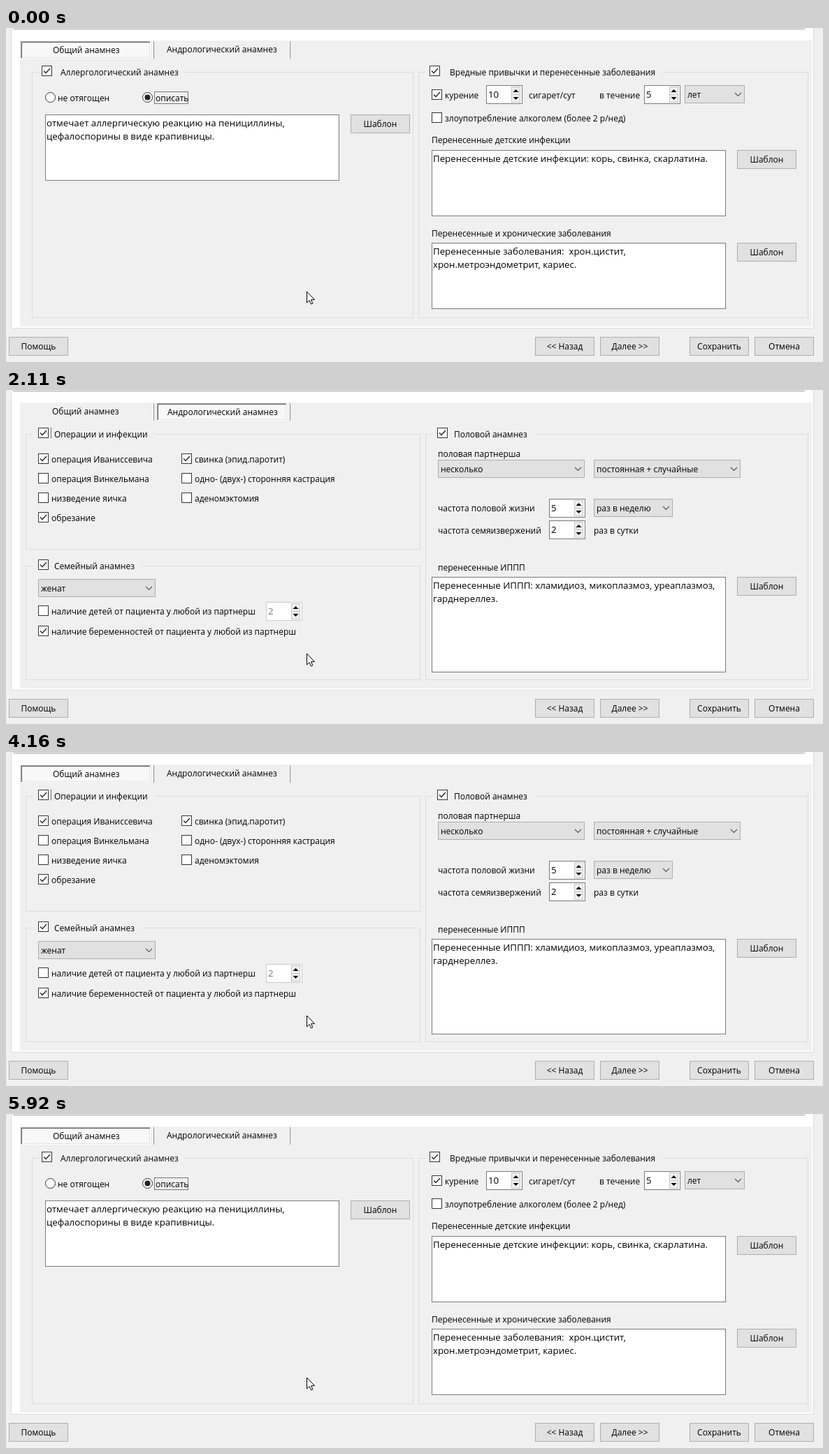
Write an HTML page with a canvas that moves like this. It is 1169x479 px and loops after 6.6 s.

```html
<!DOCTYPE html>
<html lang="ru">
<head>
<meta charset="utf-8">
<title>Анамнез</title>
<style>
html, body { margin: 0; width: 100%; height: 100%; overflow: hidden; background: #f0f0f0; }
canvas { display: block; }
</style>
</head>
<body>
<canvas id="stage" width="1169" height="479"></canvas>
<script>
const ctx = document.getElementById('stage').getContext('2d');
const LOOP = 6600;
const FACE = '#f0f0f0', EDGE = '#adadad', DARK = '#333', FIELD = '#7a7a7a';
const SMALL = 12, LARGE = 13.28;

function fill(x, y, w, h, color) {
  ctx.fillStyle = color;
  ctx.fillRect(x, y, w, h);
}

function box(x, y, w, h, bg, edge) {
  fill(x, y, w, h, edge);
  fill(x + 1, y + 1, w - 2, h - 2, bg);
}

function line(points, color, width = 1) {
  ctx.beginPath();
  points.forEach(([x, y]) => ctx.lineTo(x, y));
  ctx.strokeStyle = color;
  ctx.lineWidth = width;
  ctx.stroke();
}

function shape(points, color) {
  ctx.beginPath();
  points.forEach(([x, y]) => ctx.lineTo(x, y));
  ctx.closePath();
  ctx.fillStyle = color;
  ctx.fill();
}

function text(s, x, y, size = SMALL, color = '#000', align = 'left') {
  ctx.font = size + 'px "Open Sans", "Noto Sans", sans-serif';
  ctx.textAlign = align;
  ctx.fillStyle = color;
  ctx.fillText(s, x, y);
}

function button(s, x, y) {
  box(x, y, 85, 27, '#e1e1e1', EDGE);
  text(s, x + 42.5, y + 18, SMALL, '#000', 'center');
}

function check(x, y, on) {
  box(x, y, 15, 15, '#fff', DARK);
  if (on) line([[x + 3, y + 7.5], [x + 6, y + 10.5], [x + 12, y + 4]], '#222', 1.3);
}

function option(s, x, y, on) {
  check(x, y, on);
  text(s, x + 19, y + 13);
}

function radio(x, y, on) {
  ctx.beginPath();
  ctx.arc(x, y, 7, 0, 7);
  ctx.fillStyle = '#fff';
  ctx.fill();
  ctx.strokeStyle = DARK;
  ctx.lineWidth = 1;
  ctx.stroke();
  if (!on) return;
  ctx.beginPath();
  ctx.arc(x, y, 4, 0, 7);
  ctx.fillStyle = '#222';
  ctx.fill();
}

function dotted(x, y, w, h) {
  ctx.setLineDash([1, 1]);
  ctx.strokeStyle = '#000';
  ctx.lineWidth = 1;
  ctx.strokeRect(x + .5, y + .5, w, h);
  ctx.setLineDash([]);
}

function group(title, x, y, w, h, checkX, titleX, gapEnd) {
  ctx.strokeStyle = '#dcdcdc';
  ctx.lineWidth = 1;
  ctx.strokeRect(x + .5, y + .5, w, h);
  fill(x + 10, y, gapEnd - x - 10, 1, FACE);
  check(checkX, y - 9, true);
  text(title, titleX, y + 5);
}

function combo(s, x, y, w) {
  box(x, y, w, 26, '#e1e1e1', EDGE);
  text(s, x + 4, y + 18);
  const cx = x + w - 9.5;
  line([[cx - 4.5, y + 11], [cx, y + 15.5], [cx + 4.5, y + 11]], '#555', 1.1);
}

function spin(s, x, y, off) {
  box(x, y, 52, 27, '#fff', off ? '#ccc' : FIELD);
  text(s, x + 3, y + 18, LARGE, off ? '#777' : '#000');
  const bx = x + 36, cx = x + 42.5;
  box(bx, y + 2, 13, 12, FACE, '#c4c4c4');
  box(bx, y + 13, 13, 12, FACE, '#c4c4c4');
  shape([[cx - 4, y + 10], [cx, y + 6], [cx + 4, y + 10]], '#000');
  shape([[cx - 4, y + 17], [cx, y + 21], [cx + 4, y + 17]], '#000');
}

function area(x, y, h, rows) {
  box(x, y, 421, h, '#fff', FIELD);
  rows.forEach((s, i) => text(s, x + 2, y + 17 + i * 19, LARGE));
}

function tab(s, x, textX, active) {
  if (active) {
    fill(x, 19, 186, 25, '#fff');
    fill(x, 19, 185, 24, '#a0a0a0');
    fill(x + 1, 20, 184, 23, '#696969');
    fill(x + 2, 21, 183, 22, '#e3e3e3');
    fill(x + 2, 21, 182, 21, '#f8f8f8');
  }
  const shift = active ? 1 : 0;
  text(s, textX + shift, 35 + shift);
}

function frame() {
  fill(0, 0, 1169, 479, FACE);
  fill(7, 0, 1149, 431, '#dcdcdc');
  fill(8, 0, 1147, 430, '#fff');
  fill(10, 1, 1133, 1, '#a0a0a0');
  fill(20, 18, 1133, 410, FACE);
  button('Помощь', 4, 443);
  button('<< Назад', 757, 443);
  button('Далее >>', 850, 443);
  button('Сохранить', 978, 443);
  button('Отмена', 1071, 443);
}

function tabs(active) {
  for (const x of [211, 406]) {
    fill(x - 1, 19, 1, 25, '#fff');
    fill(x, 19, 1, 25, '#888');
  }
  tab('Общий анамнез', 21, 66, active === 0);
  tab('Андрологический анамнез', 216, 230, active === 1);
}

function general() {
  group('Аллергологический анамнез', 37, 63, 545, 352, 51, 78, 255);
  radio(63.5, 99.5, false);
  text('не отягощен', 74, 105);
  radio(202.5, 99.5, true);
  text('описать', 214, 105);
  dotted(212, 91, 48, 17);
  area(56, 124, 95, [
    'отмечает аллергическую реакцию на пенициллины,',
    'цефалоспорины в виде крапивницы.'
  ]);
  button('Шаблон', 493, 124);

  group('Вредные привычки и перенесенные заболевания', 590, 63, 557, 352, 606, 635, 938);
  option('курение', 609, 88, true);
  spin('10', 687, 82);
  text('сигарет/сут', 748, 101);
  text('в течение', 849, 101);
  spin('5', 913, 82);
  combo('лет', 971, 82, 86);
  option('злоупотребление алкоголем (более 2 р/нед)', 609, 121, false);
  text('Перенесенные детские инфекции', 609, 165);
  area(609, 175, 95, ['Перенесенные детские инфекции: корь, свинка, скарлатина.']);
  button('Шаблон', 1046, 175);
  text('Перенесенные и хронические заболевания', 609, 299);
  area(609, 308, 95, [
    'Перенесенные заболевания:  хрон.цистит,',
    'хрон.метроэндометрит, кариес.'
  ]);
  button('Шаблон', 1046, 308);
}

function andrology() {
  group('Операции и инфекции', 28, 63, 564, 165, 46, 69, 213);
  ctx.setLineDash([1, 1]);
  line([[64.5, 54], [64.5, 70]], '#000');
  ctx.setLineDash([]);
  option('операция Иваниссевича', 46, 91, true);
  option('операция Винкельмана', 46, 119, false);
  option('низведение яичка', 46, 147, false);
  option('обрезание', 46, 175, true);
  option('свинка (эпид.паротит)', 251, 91, true);
  option('одно- (двух-) сторонняя кастрация', 251, 119, false);
  option('аденомэктомия', 251, 147, false);

  group('Семейный анамнез', 28, 252, 564, 163, 46, 69, 195);
  combo('женат', 46, 271, 168);
  option('наличие детей от пациента у любой из партнерш', 46, 309, false);
  spin('2', 372, 304, true);
  option('наличие беременностей от пациента у любой из партнерш', 46, 338, true);

  group('Половой анамнез', 600, 63, 547, 352, 617, 641, 757);
  text('половая партнерша', 618, 96);
  combo('несколько', 618, 100, 210);
  combo('постоянная + случайные', 841, 100, 210);
  text('частота половой жизни', 618, 174);
  spin('5', 777, 156);
  combo('раз в неделю', 841, 156, 113);
  text('частота семяизвержений', 618, 206);
  spin('2', 777, 187);
  text('раз в сутки', 841, 206);
  text('перенесенные ИППП', 618, 259);
  area(609, 268, 137, [
    'Перенесенные ИППП: хламидиоз, микоплазмоз, уреаплазмоз,',
    'гарднереллез.'
  ]);
  button('Шаблон', 1046, 268);
}

function cursor(x, y) {
  const p = [[0, 0], [0, 16], [3.6, 12.6], [6, 18], [8.4, 17], [6, 11.7], [11, 11.7]]
    .map(([a, b]) => [x + a, y + b]);
  shape(p, '#fff');
  line([...p, p[0]], '#000');
}

// The page switches slightly before its tab is highlighted.
const within = (t, from, to) => t >= from && t < to;

function draw(t) {
  const page = within(t, 1120, 2720) || within(t, 4160, 5920);
  const active = within(t, 1200, 2720) || within(t, 4200, 5920);
  frame();
  tabs(active ? 1 : 0);
  if (page) andrology(); else general();
  cursor(430.5, 378);
}

const start = performance.now();
function tick() {
  draw((performance.now() - start) % LOOP);
  requestAnimationFrame(tick);
}
tick();
</script>
</body>
</html>
```
